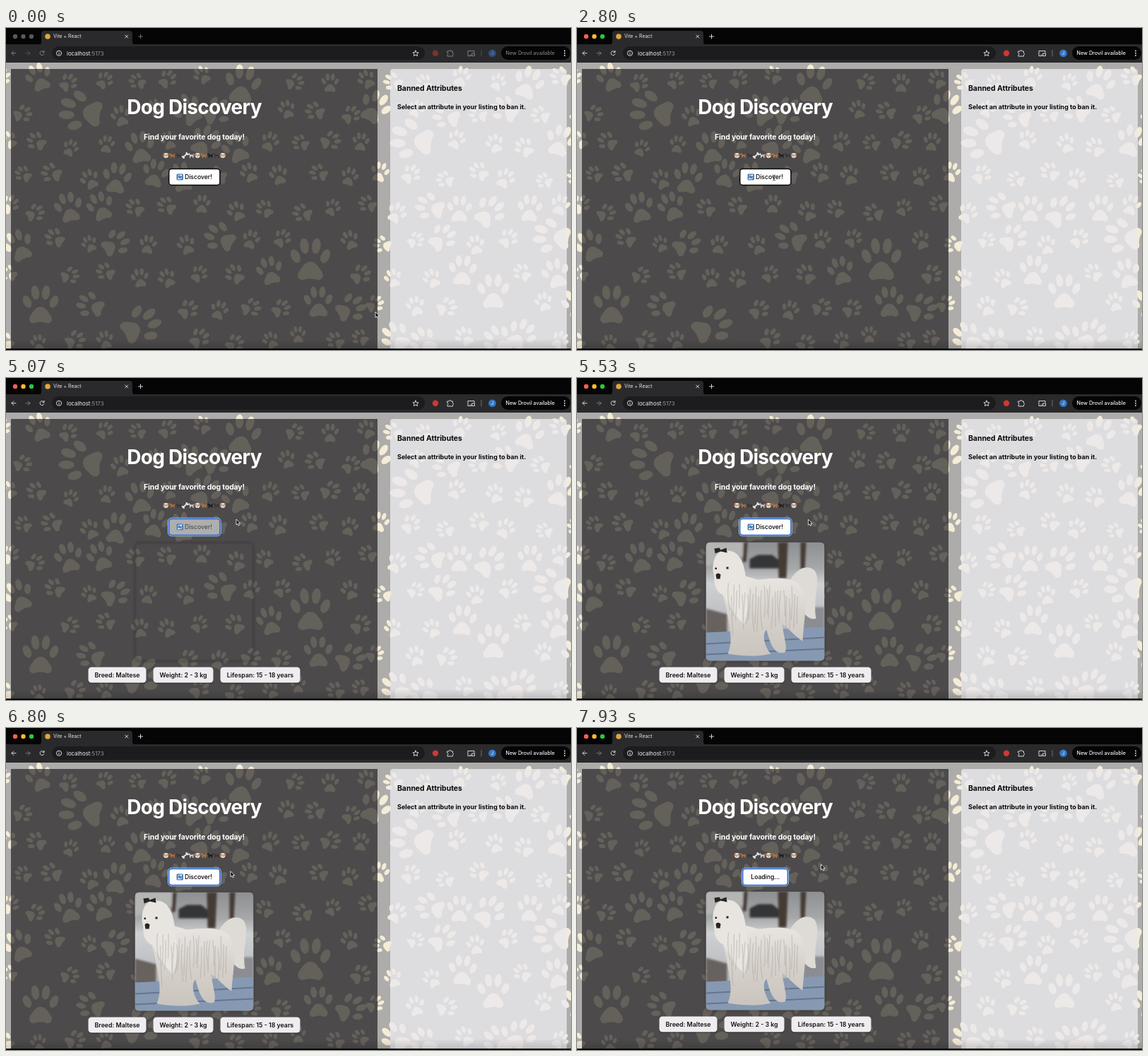
Animation of 800 by 456 pixels, one loop 8000 ms. Source, as an HTML page:

```html
<!DOCTYPE html>
<html lang="en">
<head>
<meta charset="utf-8">
<title>Dog Discovery</title>
<style>
html, body { margin: 0; width: 100%; height: 100%; overflow: hidden; background: #000; }
svg { display: block; width: 100%; height: 100%; }
text { font-family: Inter, "Open Sans", sans-serif; }
.mid { text-anchor: middle; }
.bold { font-weight: 700; }
.line { fill: none; stroke: #d6d6d8; stroke-width: 1; stroke-linecap: round; stroke-linejoin: round; }
</style>
</head>
<body>
<svg viewBox="0 0 800 456">
  <defs>
    <g id="paw">
      <path d="M0 .1C.26 .1 .36 .34 .5 .52C.68 .76 .5 1 .28 .92C.14 .86 -.14 .86 -.28 .92C-.5 1 -.68 .76 -.5 .52C-.36 .34 -.26 .1 0 .1Z"/>
      <ellipse rx=".2" ry=".33" transform="translate(-.68 -.16) rotate(-25)"/>
      <ellipse rx=".2" ry=".36" transform="translate(-.27 -.62) rotate(-8)"/>
      <ellipse rx=".2" ry=".36" transform="translate(.27 -.62) rotate(8)"/>
      <ellipse rx=".2" ry=".33" transform="translate(.68 -.16) rotate(25)"/>
    </g>
    <g id="face">
      <path d="M-3.6 -2.5L-1.6 -3.4H1.6L3.6 -2.5L3.8 1.2L1.5 3.4H-1.5L-3.8 1.2Z" fill="#e9dfd0"/>
      <path d="M-3.6 -2.5L-1.8 -3.2L-2.6 1.4L-3.9 1.2ZM3.6 -2.5L1.8 -3.2L2.6 1.4L3.9 1.2Z" fill="#b77a42"/>
      <path d="M-1.6 -1h1v1.2h-1zM.6 -1h1v1.2h-1zM-.8 1.2h1.6L0 2.2Z" fill="#332821"/>
    </g>
    <path id="hound" d="M-4 -2.6L-2.4 -3.4L-1.4 -1.2L2.4 -1L3.8 -2.8L4 -2L3 .6L3.4 3.4H2.2L1.6 1.2H-.8L-1 3.4H-2.2L-2.4 -.4L-4.2 -1.2Z"/>
    <g id="bone">
      <path d="M-2.5 2.5L3 -2.500" stroke="#e8e5df" stroke-width="1.700"/>
      <path d="M-3.300 1.700h.1M-1.700 3.200h.1M2.300 -3.200h.1M3.900 -1.600h.1" stroke="#e8e5df" stroke-width="2.600" stroke-linecap="round"/>
    </g>
    <clipPath id="photoClip"><rect width="168" height="168" rx="6"/></clipPath>
    <clipPath id="pageClip"><rect y="49" width="800" height="405"/></clipPath>
    <linearGradient id="yard" x2="0" y2="1">
      <stop stop-color="#8d8f90"/><stop offset=".22" stop-color="#a5a7a8"/>
      <stop offset=".35" stop-color="#cfd0d2"/><stop offset="1" stop-color="#a4a8b0"/>
    </linearGradient>
    <linearGradient id="coat" x2="0" y2="1">
      <stop stop-color="#e9e6e2"/><stop offset=".5" stop-color="#d6d1cb"/><stop offset="1" stop-color="#c9c4be"/>
    </linearGradient>
    <linearGradient id="dusk" x2="0" y2="1">
      <stop stop-opacity="0"/><stop offset="1" stop-opacity=".14"/>
    </linearGradient>
    <filter id="soft"><feGaussianBlur stdDeviation="1.5"/></filter>
  </defs>

  <g clip-path="url(#pageClip)">
    <rect y="49" width="800" height="407" fill="#adacaa"/>
    <g id="paws" fill="#f5ecd6"></g>
    <rect x="7" y="58" width="519" height="398" fill="#1b191b" fill-opacity=".66"/>
    <rect x="544" y="58" width="250" height="410" rx="4" fill="#eae9ed" fill-opacity=".8"/>
    <rect y="440" width="800" height="14" fill="url(#dusk)"/>
  </g>

  <rect width="800" height="24" fill="#050506"/>
  <path d="M46 24Q50 24 50 19V8Q50 4 54 4H175Q179 4 179 8V19Q179 24 183 24Z" fill="#2a2a2d"/>
  <rect y="23" width="800" height="26" fill="#2a2a2d"/>
  <rect x="65" y="26" width="528" height="19" rx="9.5" fill="#1c1c1f"/>
  <rect x="701" y="26" width="98" height="19" rx="9.5" fill="#050506"/>
  <circle cx="59" cy="12" r="3.8" fill="#e0a63a"/>
  <text x="67" y="14.4" font-size="6.9" fill="#e6e6e8">Vite + React</text>
  <path class="line" d="M168.7 10l4 4m0 -4l-4 4"/>
  <g id="lights"><circle cx="13" cy="12" r="3.2"/><circle cx="24.5" cy="12" r="3.2"/><circle cx="36" cy="12" r="3.2"/></g>
  <text x="86" y="38.5" font-size="7.8" fill="#f0f0f2">localhost<tspan fill="#97979b">:5173</tspan></text>
  <g class="line">
    <circle cx="75" cy="35.7" r="3.6"/><path d="M75 35.5v2m0 -3.7v.1"/>
    <path d="M580 32l1.2 2.6 2.9 .3 -2.2 1.9 .7 2.8 -2.6 -1.5 -2.6 1.5 .7 -2.8 -2.2 -1.9 2.9 -.3Z"/>
  </g>
  <g id="tools">
    <g class="line">
      <path d="M187.5 12h6m-3 -3v6M14 35.7H8m2.8 -2.8L8 35.7l2.8 2.8"/>
      <path d="M28 35.7h6m-2.8 -2.8l2.8 2.8 -2.8 2.8" opacity=".45"/>
      <path d="M53.7 34a3 3 0 1 0 .2 2.8M54 32.3v2.1h-2.2"/>
      <path d="M625 33h2.3a1.5 1.5 0 0 1 3 0h2.2v2.5a1.5 1.5 0 0 1 0 2.8v1.7h-7.5v-2a1.4 1.4 0 0 0 0 -2.7Z"/>
      <path d="M658 39.5h-4v-7h9v2.5m-3 1h3.5v3.5h-3.5zm-1 3.5l-2 -2"/>
      <path d="M673 31.5v8.5" opacity=".4"/>
    </g>
    <circle cx="608" cy="35.7" r="4.2" fill="#d2382d"/>
    <circle cx="688.5" cy="35.7" r="5.3" fill="#3478c8"/>
    <text class="mid" x="688.5" y="38" font-size="6.5" fill="#fff">J</text>
    <text x="707.5" y="38.3" font-size="7.2" font-weight="500" fill="#f2f2f4">New Drovil available</text>
  </g>
  <path d="M791 32.5v.1m0 3.1v.1m0 3.100v.1" stroke="#f2f2f4" stroke-width="1.800" stroke-linecap="round"/>

  <g fill="#fff" class="mid bold">
    <text x="266.5" y="121.5" font-size="28" letter-spacing="-.026em">Dog Discovery</text>
    <text x="266.5" y="157.5" font-size="10.4" letter-spacing="-.01em">Find your favorite dog today!</text>
  </g>
  <g class="bold" fill="#0a0a0b">
    <text x="554" y="89" font-size="10.4">Banned Attributes</text>
    <text x="554" y="115" font-size="9">Select an attribute in your listing to ban it.</text>
  </g>
  <g id="emoji"></g>

  <rect id="ring" y="198.2" height="25.600" rx="5" fill="none" stroke="#a9c6f4"/>
  <rect id="button" y="199.500" height="23" rx="4" stroke-width="1.500"/>
  <g id="refresh">
    <rect x="241.500" y="206.500" width="9.500" height="9" rx="1.500" fill="#4c7fb6"/>
    <path d="M243.400 210.300a3 3 0 0 1 5 -1.300m.2 -1.500v1.800h-1.800M249 211.700a3 3 0 0 1 -5 1.300m-.2 1.500v-1.800h1.800" fill="none" stroke="#fff"/>
  </g>
  <text id="label" y="214" font-size="8.600" font-weight="500"></text>

  <g id="result">
    <rect x="182.500" y="233" width="168" height="168" rx="6" fill="none" stroke="#000" stroke-opacity=".22" stroke-width="2" filter="url(#soft)"/>
    <g id="photo" transform="translate(182.500 232.500)" clip-path="url(#photoClip)">
      <rect width="168" height="168" fill="url(#yard)"/>
      <g filter="url(#soft)">
        <path d="M0 0H52V20L0 34Z" fill="#b5b5b4"/>
        <path d="M62 24L74 18H94L104 26V37H62Z" fill="#343438"/>
        <path d="M102 0H116L114 51H103ZM134 0H142L140 38H134ZM54 0H59L57 28H52Z" fill="#453a36"/>
        <path d="M0 94L30 102V130H0Z" fill="#67625f"/>
        <path d="M118 92H168V126H118Z" fill="#8b8d92"/>
      </g>
      <path d="M0 128L168 120V168H0Z" fill="#8799b2"/>
      <path d="M0 144L168 135M0 159L168 151" stroke="#64768f" stroke-width="2"/>
      <path d="M114 68C120 42 141 28 154 40C164 56 151 78 156 108C146 112 138 100 132 90Z" fill="#dedad5"/>
      <path d="M20 60C40 44 58 47 73 53C98 51 122 48 134 62C146 80 139 106 137 140C126 134 118 122 108 116C110 134 116 148 112 156C100 160 92 150 86 124C78 130 84 150 92 158C72 163 50 161 31 158C40 138 32 114 28 90Z" fill="url(#coat)"/>
      <path d="M10 40C9 21 18 10 31 12C45 12 53 25 56 46C60 70 62 91 54 116C42 106 34 91 25 75C15 72 11 60 12 51Z" fill="#e8e4df"/>
      <g id="hair" fill="none" stroke="#a9a29b" stroke-width="1.300" opacity=".45"></g>
      <path d="M12 9L19 8L21 11L29 8L30 15L21 13L13 16Z" fill="#292724"/>
      <path d="M14 46Q17 42 21 46L20 52H15ZM29 35h3v3h-3zM13 36h2.500v2.500h-2.500z" fill="#272423"/>
    </g>
    <g id="facts" font-size="8.800" font-weight="600"></g>
  </g>

  <rect y="454" width="800" height="2" fill="#050506"/>
  <path id="arrow" d="M0 0V8L1.900 6.300L3.200 9.200L4.600 8.500L3.300 5.800H5.700Z" fill="#080808" stroke="#fff" stroke-width=".8"/>
  <path id="beam" d="M-2 -4Q0 -4 0 -2.500V2.500Q0 4 -2 4M2 -4Q0 -4 0 -2.500V2.500Q0 4 2 4M-1 1H1" fill="none" stroke="#4b4b4b" stroke-width=".9"/>
  <path id="hand" d="M-.8 0Q0 -1 .8 0V3.200L3.900 4Q4.800 4.300 4.600 5.500L4 8.800H-1.500L-3.500 5.500Q-3.600 4.200 -2.300 4.600L-.8 5.800Z" fill="#fff" stroke="#111" stroke-width=".8"/>
</svg>
<script>
const $ = id => document.getElementById(id);
const LOOP = 8000, FADE = 250;
const FOCUS = 300, CLICK = 3650, LOADED = 4850, PHOTO = 5400, CLICK_AGAIN = 7400;
const HOVERS = [[2830, 4900], [6830, 7640]];
const MOVES = [
  { from: 1070, to: 2670, x: 279, y: 212 },
  { from: 2800, to: 3250, x: 284, y: 212 },
  { from: 4600, to: 5070, x: 326, y: 200 },
  { from: 5330, to: 5900, x: 331, y: 201 },
  { from: 6600, to: 7150, x: 288, y: 207 },
  { from: 7450, to: 7880, x: 345.5, y: 193 }
];

function seeded(seed) {
  return () => (seed = (seed * 16807) % 2147483647) / 2147483647;
}

function scatterPaws() {
  const random = seeded(71), cell = 46;
  const paws = [[106, 118, 31, -80], [335, 80, 28, 10], [431, 328, 31, 0], [49, 392, 28, 0],
    [191, 421, 29, 60], [575, 158, 31, -80], [690, 373, 25, 0], [773, 295, 27, -80]];
  const landmarks = paws.length;
  for (let row = 0; row < 9; row++) {
    for (let column = 0; column < 18; column++) {
      const x = (column + row % 2 / 2) * cell + 14 * (random() - .5);
      const y = 72 + row * cell + 14 * (random() - .5);
      const radius = random() < .27 ? 19 + 5 * random() : 12 + 3 * random();
      const turn = 150 * (random() - .5);
      const free = paws.slice(0, landmarks).every(p => Math.hypot(p[0] - x, p[1] - y) > p[2] + radius);
      if (free) paws.push([x, y, radius, turn]);
    }
  }
  return paws.map(([x, y, r, turn]) =>
    `<use href="#paw" transform="translate(${x} ${y}) rotate(${turn}) scale(${r})"/>`).join('');
}

function strands() {
  const random = seeded(9);
  return Array.from({ length: 26 }, (_, i) => {
    const x = 32 + i * 3.9, top = 58 + 22 * random(), length = 34 + 24 * random();
    return `<path d="M${x} ${top}q${4 - 8 * random()} ${length / 2} ${3 - 6 * random()} ${length}"/>`;
  }).join('');
}

function emojiRow() {
  const kinds = { f: ['face'], b: ['bone'], t: ['hound', '#b9733a'], g: ['hound', '#39353a'],
    k: ['hound', '#1b191b'], w: ['hound', '#cfd0d3'] };
  return [...'ftgbwftkgf'].map((key, i) => {
    const [shape, fill = 'none'] = kinds[key];
    return `<use href="#${shape}" x="${226.5 + i * 8.95}" y="180.5" fill="${fill}"/>`;
  }).join('');
}

function factPills() {
  let x = 116.5;
  return [['Breed: Maltese', 82], ['Weight: 2 - 3 kg', 85], ['Lifespan: 15 - 18 years', 113]].map(([text, width]) => {
    const pill = `
      <rect x="${x}" y="411" width="${width}" height="22" rx="4.5" opacity=".35"/>
      <rect x="${x}" y="409.5" width="${width}" height="22" rx="4.5" fill="#efedf0"/>
      <text class="mid" x="${x + width / 2}" y="423.7" fill="#111">${text}</text>`;
    x += width + 10;
    return pill;
  }).join('');
}

const clamp = v => Math.min(1, Math.max(0, v));
const smooth = u => u * u * (3 - 2 * u);
const show = (id, visible) => $(id).style.display = visible ? '' : 'none';
function set(id, attributes) {
  for (const name in attributes) $(id).setAttribute(name, attributes[name]);
}

function pointerAt(t) {
  let x = 523, y = 402;
  for (const move of MOVES) {
    const k = smooth(clamp((t - move.from) / (move.to - move.from)));
    x += (move.x - x) * k;
    y += (move.y - y) * k;
  }
  return [x, y];
}

function drawWindow(focused) {
  const colors = ['#fe5f57', '#febc2e', '#28c840'];
  [...$('lights').children].forEach((light, i) => light.setAttribute('fill', focused ? colors[i] : '#59595b'));
  set('tools', { opacity: focused ? 1 : .5 });
}

function drawButton(t, loading) {
  const dark = Math.max(...HOVERS.map(([on, off]) => clamp((t - on) / FADE) - clamp((t - off) / FADE)));
  const gray = v => `rgb(${[v, v, v].map(Math.round)})`;
  const x = loading ? 234.7 : 230.7, width = loading ? 63.6 : 72.2;
  const ringed = t >= CLICK;
  set('button', { x, width, fill: gray(255 * (1 - dark)), stroke: ringed ? '#2f6fd6' : '#08080a' });
  set('ring', { x: x - 1.3, width: width + 2.6 });
  set('label', { x: loading ? 246.3 : 253, fill: gray(255 * dark) });
  $('label').textContent = loading ? 'Loading...' : 'Discover!';
  show('ring', ringed);
  show('refresh', !loading);
}

function drawPointer(t) {
  const hovering = HOVERS.some(([on, off]) => t >= on && t < off);
  const kind = hovering ? 'hand' : t > 2550 && t < HOVERS[0][0] ? 'beam' : 'arrow';
  for (const id of ['arrow', 'beam', 'hand']) show(id, id === kind);
  set(kind, { transform: `translate(${pointerAt(t)})` });
}

function draw(t) {
  drawWindow(t >= FOCUS);
  drawButton(t, t >= CLICK && t < LOADED || t >= CLICK_AGAIN);
  show('result', t >= LOADED);
  show('photo', t >= PHOTO);
  set('result', { transform: `translate(0 ${t >= CLICK_AGAIN ? -1 : 0})` });
  drawPointer(t);
}

$('paws').innerHTML = scatterPaws();
$('hair').innerHTML = strands();
$('emoji').innerHTML = emojiRow();
$('facts').innerHTML = factPills();

const start = performance.now();
function tick() {
  draw((performance.now() - start) % LOOP);
  requestAnimationFrame(tick);
}
tick();
</script>
</body>
</html>
```
